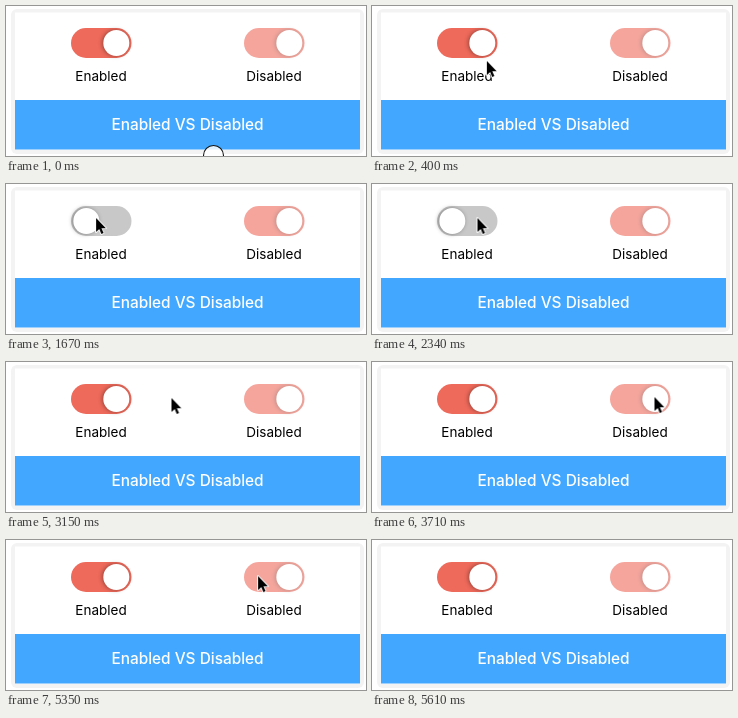
Recreate the animation shown at these times as an HTML page. Size 360 px wide and 150 px high, loop 6.16 s.

```html
<!DOCTYPE html>
<html lang="en">
<head>
<meta charset="utf-8">
<title>Enabled VS Disabled</title>
<style>
  html, body { margin: 0; width: 100%; height: 100%; overflow: hidden; background: #fff; }
  svg { display: block; width: 360px; height: 150px; }
  text { font-family: Inter, Roboto, sans-serif; text-anchor: middle; }
  .label { font-size: 13.5px; fill: #000; }
  .title { font-size: 15.4px; font-weight: 500; fill: #fff; }

  .track { fill: #ee6a5b; }
  .knob { fill: #fff; filter: drop-shadow(-.5px 0 2px rgba(0, 0, 0, .38)); }
  .disabled { opacity: .6; }

  .live .track, .live .knob, .cursor, .dot { animation: 6160ms linear infinite; }
  .live .track { animation-name: tint; }
  .live .knob { animation-name: slide; }
  .cursor { animation-name: roam; }
  .dot { animation-name: vanish; }

  @keyframes tint {
    0%, 16.8% { fill: #ee6a5b; animation-timing-function: ease; }
    23.7%, 40.5% { fill: #c8c8c8; animation-timing-function: ease; }
    47.4%, 100% { fill: #ee6a5b; }
  }
  @keyframes slide {
    0%, 16.8% { transform: translateX(0); animation-timing-function: ease; }
    23.7%, 40.5% { transform: translateX(-30px); animation-timing-function: ease; }
    47.4%, 100% { transform: translateX(0); }
  }
  @keyframes vanish {
    0% { opacity: 1; animation-timing-function: step-end; }
    .48%, 100% { opacity: 0; }
  }
  @keyframes roam {
    0% { transform: translate(207px, 170px); animation-timing-function: step-end; }
    .48% { transform: translate(206px, 147px); animation-timing-function: cubic-bezier(.3, .2, .4, 1); }
    10.23%, 10.3% { transform: translate(100px, 40px); animation-timing-function: ease-out; }
    12.98%, 26.7% { transform: translate(90px, 34px); animation-timing-function: ease-in-out; }
    35.06% { transform: translate(106px, 34px); animation-timing-function: step-end; }
    37.98%, 49.75% { transform: translate(105.5px, 34px); animation-timing-function: cubic-bezier(.4, .2, .7, .7); }
    51.13% { transform: translate(164px, 36px); animation-timing-function: cubic-bezier(.25, .5, .5, 1); }
    55.7% { transform: translate(313px, 36px); animation-timing-function: ease-in-out; }
    59.25% { transform: translate(283px, 36px); animation-timing-function: step-end; }
    60.22% { transform: translate(282.5px, 35px); animation-timing-function: step-end; }
    61.68%, 71.5% { transform: translate(282px, 34px); animation-timing-function: ease-in; }
    74.67% { transform: translate(257px, 33.4px); animation-timing-function: ease-out; }
    77.11% { transform: translate(250.5px, 33px); animation-timing-function: step-end; }
    80.03%, 86.5% { transform: translate(250px, 33.5px); animation-timing-function: cubic-bezier(.5, .1, .8, .8); }
    91.06%, 100% { transform: translate(347px, 154px); }
  }
</style>
</head>
<body>
<svg viewBox="0 0 360 150">
  <defs>
    <filter id="soft" x="-5%" y="-5%" width="110%" height="110%">
      <feGaussianBlur stdDeviation=".6"/>
    </filter>
    <g id="arrow">
      <path d="M0 0V14L3.2 11 5.3 16 7.5 15 5.4 10.2H9.8Z"/>
    </g>
  </defs>

  <rect x="5" y="3" width="353" height="145" rx="6" fill="#f3f3f3" filter="url(#soft)"/>
  <rect x="9" y="6.5" width="345" height="137" fill="#fff"/>
  <rect x="9" y="94" width="345" height="49.5" fill="#42a8ff"/>

  <g class="live">
    <rect class="track" x="65" y="22" width="60.5" height="30" rx="15"/>
    <circle class="knob" cx="110.3" cy="37" r="13"/>
  </g>
  <g class="disabled">
    <rect class="track" x="238" y="22" width="60.5" height="30" rx="15"/>
    <circle class="knob" cx="283.3" cy="37" r="13"/>
  </g>

  <text class="label" x="95" y="75">Enabled</text>
  <text class="label" x="268" y="75">Disabled</text>
  <text class="title" x="181.5" y="124.3">Enabled VS Disabled</text>

  <circle class="dot" cx="207.5" cy="149.5" r="10" fill="#fff" fill-opacity=".85" stroke="#111" stroke-width="1.1"/>
  <g class="cursor">
    <use href="#arrow" fill="#fff" stroke="#fff" stroke-width="1.8" stroke-linejoin="round"/>
    <use href="#arrow" fill="#000"/>
  </g>
</svg>
</body>
</html>
```
